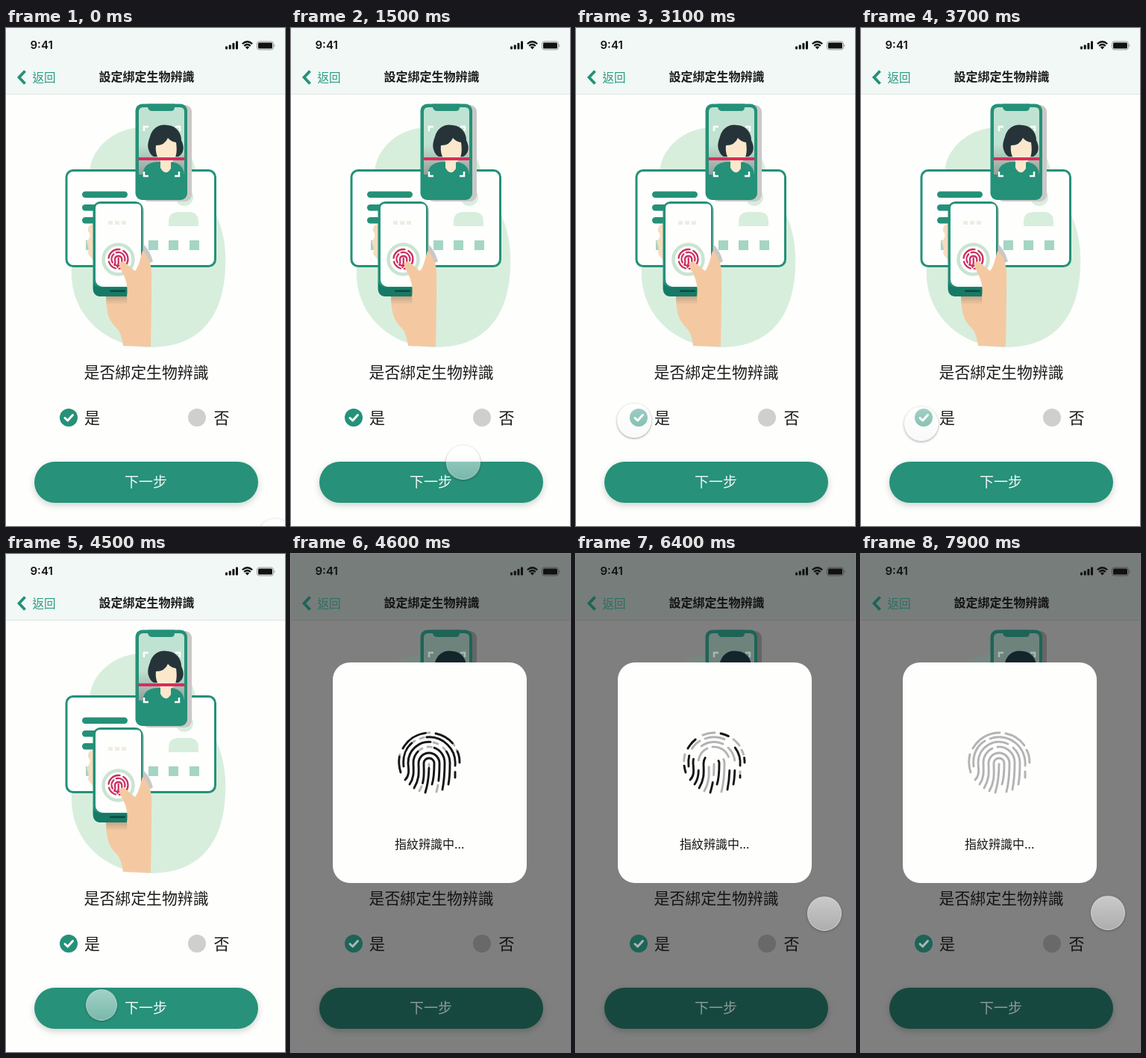
Write an HTML page that moves like this. It is 374x666 px and loops after 8000 ms.

```html
<!DOCTYPE html>
<html lang="zh-Hant">
<head>
<meta charset="utf-8">
<title>設定綁定生物辨識</title>
<style>
html, body { margin: 0; width: 100%; height: 100%; overflow: hidden; }
#stage {
  position: relative; width: 374px; height: 666px; overflow: hidden;
  background: var(--page);
  --page: #fefefd; --bar: #f1f8f5; --rule: #dfe6e3; --green: #249178; --btn: #27917a;
  --blob: #d8eedd; --screen: #c0e2d2; --shade: #cac8c6; --hair: #26343a; --back: #2a9a84;
  --off: #cfcfcd; --mark: #fefefd; --label: #f1f8f4; --glow: #c9d2cc; --ink: #1b1b1b;
  animation: dim 8s step-end infinite;
}
@keyframes dim {
  57.45% {
    --page: #7f7f7f; --bar: #767d7b; --rule: #6f7573; --green: #1d6457; --btn: #17483f;
    --blob: #778680; --screen: #6f837d; --shade: #656564; --hair: #13252a; --back: #2a7064;
    --off: #696969; --mark: #a8b8b3; --label: #8b9b96; --glow: #636866; --ink: #131313;
  }
}
svg { position: absolute; inset: 0; }
text { font-family: "Noto Sans CJK TC", "Noto Sans CJK JP", "Noto Sans CJK", sans-serif; fill: var(--ink); }
.clock { font: 600 15px Inter, sans-serif; fill: #111; }
.green { fill: var(--green); }
.blob { fill: var(--blob); }
.shade { fill: var(--shade); }
.hair { fill: var(--hair); }
.mark { fill: none; stroke: var(--mark); }
.red { fill: none; stroke: #cb2f62; stroke-width: 2.3; stroke-linecap: round; }
.button { fill: var(--btn); filter: drop-shadow(0 3px 4px var(--glow)); }

.modal { visibility: hidden; animation: open 8s step-end infinite; }
@keyframes open { 57.45% { visibility: visible; } }
.ridges {
  fill: none; stroke: #b3b3b3; stroke-width: 2.9; stroke-linecap: round;
  stroke-dasharray: 1 1.2; animation: rest 2s -.1s linear infinite;
}
.scan { stroke: #161616; animation-name: scan; }
/* pale lines slide out ahead of the dark ones, then follow them back in */
@keyframes rest {
  0%, 3% { stroke-dashoffset: 0; }
  25% { stroke-dashoffset: -.62; }
  35% { stroke-dashoffset: -.92; }
  40% { stroke-dashoffset: -1.1; }
  65% { stroke-dashoffset: 1.1; }
  97%, 100% { stroke-dashoffset: 0; }
}
@keyframes scan {
  0%, 3% { stroke-dashoffset: 1.1; }
  25% { stroke-dashoffset: .64; }
  35% { stroke-dashoffset: .13; }
  45%, 60% { stroke-dashoffset: 0; }
  97%, 100% { stroke-dashoffset: -1.1; }
}

#touch {
  position: absolute; left: -23px; top: -23px; width: 46px; height: 46px;
  box-sizing: border-box; border-radius: 50%;
  border: 1px solid rgba(255, 255, 255, .3);
  background: linear-gradient(rgba(255, 255, 255, .58), rgba(245, 245, 245, .4));
  box-shadow: 0 1px 3px rgba(50, 50, 50, .5);
  animation: touch 8s ease-in-out infinite;
}
@keyframes touch {
  0%, 3.75% { transform: translate(361px, 679px); }
  18.75% { transform: translate(231px, 581px); animation-timing-function: ease-out; }
  32.5% { transform: translate(79px, 526px); }
  38.75%, 45% { transform: translate(78px, 525px); }
  52.5% { transform: translate(127px, 602px); }
  54.5% { transform: translate(128px, 603px) scale(.91); }
  57.44% { transform: translate(128px, 603px) scale(.91); opacity: 1; }
  57.45%, 62% { transform: translate(128px, 603px); opacity: 0; }
  65% { opacity: 1; }
  74%, 80% { transform: translate(333px, 481px); }
  98.75%, 100% { transform: translate(331px, 480px); opacity: 1; }
}
</style>
</head>
<body>
<div id="stage">
<svg width="374" height="666" viewBox="0 0 374 666">
  <defs>
    <linearGradient id="fade" x2="0" y2="1">
      <stop offset=".55" stop-color="#8f9794" stop-opacity="0"/>
      <stop offset="1" stop-color="#8f9794" stop-opacity=".9"/>
    </linearGradient>
    <linearGradient id="palm" x2="0" y2="1">
      <stop offset="0" stop-color="#776857"/>
      <stop offset=".35" stop-color="#f4c9a2"/>
    </linearGradient>
    <g id="print">
      <path pathLength="1" d="M150 260A41 41 0 0 1 186 239"/>
      <path pathLength="1" d="M194 240A41 41 0 0 1 219 256"/>
      <path pathLength="1" d="M147 292Q143 279 146 268"/>
      <path pathLength="1" d="M226 279Q226 269 222 262"/>
      <path pathLength="1" d="M220 299V291"/>
      <path pathLength="1" d="M151 284C149 267 157 255 166 250"/>
      <path pathLength="1" d="M220 283A35 35 0 0 0 173 247"/>
      <path pathLength="1" d="M153 302C160 295 157 286 157 279A28 28 0 0 1 197 254"/>
      <path pathLength="1" d="M211 308Q213 298 213 279A28 28 0 0 0 204 259"/>
      <path pathLength="1" d="M159 308C166 298 164 288 164 279A21 21 0 0 1 176 260"/>
      <path pathLength="1" d="M203 315C205 305 206 295 206 279A21 21 0 0 0 183 258"/>
      <path pathLength="1" d="M165 313C173 300 171 290 171 280A14 14 0 0 1 199 280C199 296 198 306 195 318"/>
      <path pathLength="1" d="M189 308C191 302 192 294 192 280A7 7 0 0 0 178 280C178 292 180 303 172 317"/>
      <path pathLength="1" d="M180 319C184 306 185 296 185 281"/>
    </g>
  </defs>

  <!-- status and title bars -->
  <rect width="374" height="88" fill="var(--bar)"/>
  <rect y="88" width="374" height="1" fill="var(--rule)"/>
  <text class="clock" x="32.5" y="28">9:41</text>
  <g fill="#111">
    <rect x="294" y="24.5" width="3" height="4" rx="1"/>
    <rect x="298.7" y="22.5" width="3" height="6" rx="1"/>
    <rect x="303.4" y="20" width="3" height="8.5" rx="1"/>
    <rect x="308" y="17.5" width="3" height="11" rx="1"/>
    <path d="M320.8 25.6Q323.5 23.4 326.2 25.6L323.5 28.5Z"/>
    <rect x="338" y="19.5" width="19" height="8" rx="1.5"/>
    <path d="M359.5 21.5Q361.5 23.5 359.5 25.5Z" opacity=".45"/>
  </g>
  <path d="M316.8 21.3Q323.5 15.2 330.2 21.3M319.2 24Q323.5 20 327.8 24" fill="none" stroke="#111" stroke-width="2.2"/>
  <rect x="336.5" y="18" width="22" height="11" rx="3.2" fill="none" stroke="#111" stroke-opacity=".4"/>
  <path d="M25.5 57.5L17.5 66L25.5 74.5" fill="none" stroke="var(--green)" stroke-width="3.8"/>
  <text x="35.5" y="72" font-size="15.5" style="fill:var(--back)">返回</text>
  <text x="124.5" y="71.3" font-size="16" font-weight="700">設定綁定生物辨識</text>

  <!-- card -->
  <path class="blob" d="M180 133C148 134 113 158 112 195C110 250 85 285 88 335C92 387 135 427 195 427C260 427 292 385 294 320C297 260 272 235 258 205C250 165 235 131 180 133Z"/>
  <rect x="81" y="190.5" width="199.5" height="128" rx="9" fill="var(--page)" stroke="var(--green)" stroke-width="3"/>
  <g class="green">
    <rect x="102" y="218.5" width="61" height="8.5" rx="4.2"/>
    <rect x="102" y="236" width="40" height="8.5" rx="4.2"/>
    <rect x="102" y="253" width="40" height="8.5" rx="4.2"/>
  </g>
  <path d="M107 284h13v13h-13zM191 284h13v13h-13zM218 284h13v13h-13zM246 284h13v13h-13z" fill="#a5d5c4"/>
  <circle class="blob" cx="239" cy="226" r="12"/>
  <path class="blob" d="M218 265V259Q218 246 231 246H245Q258 246 258 259V265Z"/>

  <!-- phone with face scan -->
  <rect class="shade" x="182" y="103" width="67" height="129" rx="9"/>
  <rect class="green" x="173.5" y="101.5" width="69.5" height="128.5" rx="9"/>
  <path d="M184 106H233Q239 106 239 112V196H178V112Q178 106 184 106Z" fill="var(--screen)"/>
  <rect x="178" y="106" width="61" height="90" fill="url(#fade)"/>
  <path class="green" d="M190 101.5H226V106Q226 111 221 111H196Q191 111 190 106Z"/>
  <path class="green" d="M183 200C183 185 190 180 203 179H222C234 181 239 187 239 200Z"/>
  <path class="hair" d="M192 165C188 156 192 149 194 142C199 131 208 128 217 130C229 131 235 141 235 150C240 160 238 168 231 172H198Q194 170 192 165Z"/>
  <path d="M201 157Q213 157 217 147Q221 152 228 153C230 166 228 177 221 180V188Q214 199 207 187V178C202 173 200 165 201 157Z" fill="#fbe8cc"/>
  <rect x="177.5" y="173" width="62" height="4" fill="#d92c5c"/>
  <path class="mark" stroke-width="2.5" d="M185 138V132H191M227 132H233V138M185 192V198H191M226 198H232V192"/>

  <!-- phone held in a hand -->
  <path d="M118 262Q109 262 110 272Q116 277 108 286Q112 294 110 302L118 312Z" fill="#f8dbbe"/>
  <path d="M134 355H166L195 340L194 426L157 425C155 412 153 405 145 398C136 388 134 375 134 355Z" fill="url(#palm)"/>
  <path class="shade" d="M172 234H177Q185 236 185 245V290Q193 298 197 312L182 320Z"/>
  <rect class="green" x="116.5" y="232" width="67" height="127" rx="10"/>
  <path d="M126 235H175Q181 235 181 241V346H129Q120 344 120 336V241Q120 235 126 235Z" fill="var(--page)"/>
  <path d="M117 340Q119 347 130 347H181V350Q180 359 171 359H127Q117 359 117 348Z" fill="#167a66"/>
  <rect x="139" y="350.5" width="21" height="2.5" rx="1.2" fill="#0c4a40"/>
  <path d="M137 258h6v5h-6zM146 258h6v5h-6zM155 258h6v5h-6z" fill="#f0ecdf"/>
  <circle cx="150.5" cy="309.5" r="20" fill="var(--page)" stroke="#cae4d2" stroke-width="4.5"/>
  <g class="red">
    <circle cx="150.5" cy="309" r="13" stroke-dasharray="19 5 13 5 21 5"/>
    <circle cx="150.5" cy="309" r="9" stroke-dasharray="12 4 19 5" transform="rotate(150 150.5 309)"/>
    <path d="M145.5 317Q147 313 146 309A4.7 4.7 0 0 1 155.3 309V315M150.7 308Q151.5 314 149.5 320"/>
  </g>
  <path d="M183 298C195 309 196 324 195 345L194 426L157 425C157 402 165 387 162 359C164 346 161 335 154 323C149 315 154 309 161 315L173 325C179 317 180 307 183 298Z" fill="#f4c9a2"/>

  <!-- question and choices -->
  <text x="104.5" y="467.5" font-size="20.9">是否綁定生物辨識</text>
  <circle class="green" cx="84" cy="521" r="12"/>
  <path class="mark" stroke-width="3" stroke-linecap="round" stroke-linejoin="round" d="M79 521.5L82.7 525L89.5 517.5"/>
  <text x="105" y="528.5" font-size="21">是</text>
  <circle cx="256" cy="521" r="12" fill="var(--off)"/>
  <text x="278.5" y="528.5" font-size="21">否</text>
  <rect class="button" x="38" y="580" width="300" height="55" rx="27.5"/>
  <text x="159" y="614" font-size="19" style="fill:var(--label)">下一步</text>

  <g class="modal">
    <rect x="56" y="145" width="260" height="295" rx="23" fill="#fefefd"/>
    <use href="#print" class="ridges"/>
    <use href="#print" class="ridges scan"/>
    <text x="139" y="394" font-size="16">指紋辨識中...</text>
  </g>
</svg>
<div id="touch"></div>
</div>
</body>
</html>
```
